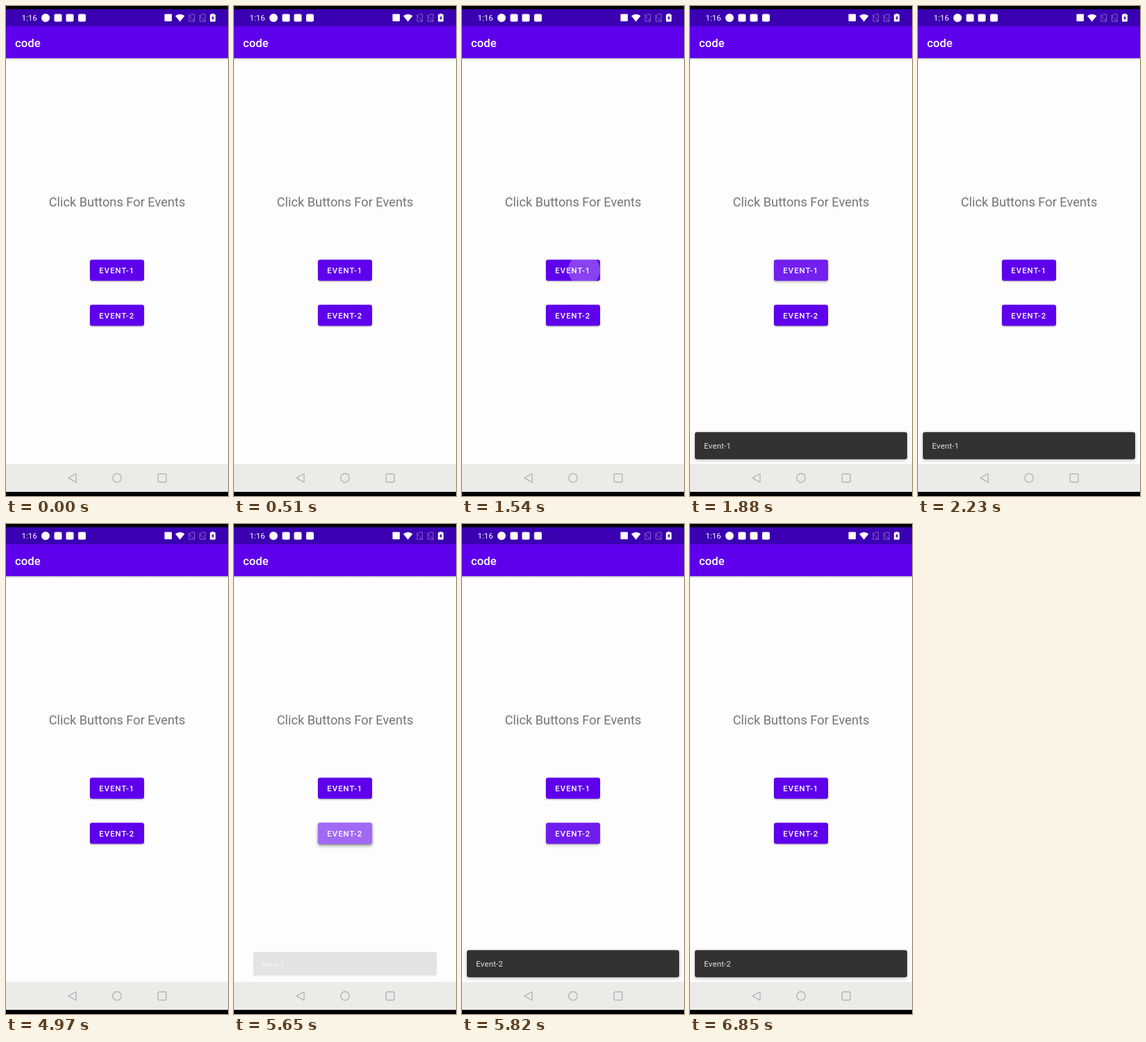
Recreate the animation shown at these times as an HTML page. Size 320 px wide and 704 px high, loop 8000 ms.

```html
<!DOCTYPE html>
<html lang="en">
<head>
<meta charset="utf-8">
<title>Button events</title>
<style>
html, body { margin: 0; width: 100%; height: 100%; overflow: hidden; background: #000; }
svg { display: block; width: 100vw; height: 100vh; font-family: Roboto, sans-serif; }
.label { font-size: 11.4px; font-weight: 500; letter-spacing: 1.02px; fill: #fff; }
.nav { fill: none; stroke: #b4b4b8; stroke-width: 1.4; stroke-linejoin: round; }
</style>
</head>
<body>
<svg viewBox="0 0 320 704" xmlns="http://www.w3.org/2000/svg">
  <defs>
    <filter id="soft" x="-20%" y="-60%" width="140%" height="220%"><feGaussianBlur stdDeviation="1"/></filter>
    <filter id="softer" x="-20%" y="-60%" width="140%" height="220%"><feGaussianBlur stdDeviation="2.6"/></filter>
    <linearGradient id="edge" x1="0" y1="0" x2="0" y2="1">
      <stop offset="0" stop-color="#666" stop-opacity=".35"/>
      <stop offset="1" stop-color="#666" stop-opacity="0"/>
    </linearGradient>
  </defs>
  <rect width="320" height="704" fill="#000"/>
  <rect y="75" width="320" height="583" fill="#fdfdfd"/>
  <rect y="75" width="320" height="3" fill="url(#edge)"/>
  <rect y="4.6" width="320" height="25" fill="#3a00b2"/>
  <rect y="29" width="320" height="46" fill="#5f00ec"/>

  <g fill="#fff">
    <text x="22.5" y="21" font-size="11.6">1:16</text>
    <circle cx="57" cy="17" r="6"/>
    <rect x="69.5" y="11.5" width="11" height="11" rx="2"/>
    <rect x="86.5" y="11.5" width="11" height="11" rx="2"/>
    <rect x="104" y="11.5" width="11" height="11" rx="2"/>
    <rect x="228.5" y="11.5" width="10.5" height="10.5" rx="1"/>
    <path d="M244 14.3Q250.7 9.2 257.4 14.3L250.7 22.6Z"/>
    <path d="M296.3 12V11H299.7V12H301Q302 12 302 13V21.5Q302 22.5 301 22.5H295Q294 22.5 294 21.5V13Q294 12 295 12Z"/>
  </g>
  <path d="M298.7 13.6L296 17.8H297.6V20.8L300.2 16.6H298.7Z" fill="#3a00b2"/>
  <g id="sims" fill="none" stroke="#8a62cc" stroke-width="1"></g>

  <text x="13" y="58.6" font-size="16.7" font-weight="500" fill="#fff">code</text>
  <text x="160" y="288.3" font-size="18.25" text-anchor="middle" fill="#757575">Click Buttons For Events</text>

  <g id="buttons"></g>

  <rect y="658" width="320" height="40" fill="#ebebea"/>
  <g class="nav">
    <path d="M101 672V684.4L90 678.2Z"/>
    <circle cx="160" cy="678" r="6.2"/>
    <rect x="219.2" y="672.2" width="11.8" height="11.8" rx="2"/>
  </g>

  <g id="snack">
    <rect x="7" y="613.5" width="306" height="39" rx="3" fill="#777" opacity=".5" filter="url(#softer)"/>
    <rect x="7" y="612.3" width="306" height="39" rx="3" fill="#323232"/>
    <text id="msg" x="20.3" y="636.2" font-size="11.4" letter-spacing=".2" fill="#e2e2e2"></text>
  </g>
</svg>
<script>
const LOOP = 8000;

// Moments at which the screen refreshes.
const steps = [0, 1540, 1710, 1880, 2060, 2230, 4620, 4800, 4970, 5310, 5480, 5650, 5820, 5990];

const taps = [
  { n: 1, x: 176, down: 1540, up: 1700 },
  { n: 2, x: 168, down: 5310, up: 5632 }
];
const snacks = [
  { n: 1, show: 1715, hide: 4605 },
  { n: 2, show: 5632, hide: Infinity }
];

const $ = id => document.getElementById(id);
const clamp = v => Math.min(1, Math.max(0, v));
const easeOut = p => 1 - (1 - p) ** 3;

function set(id, attrs) {
  for (const key in attrs) $(id).setAttribute(key, attrs[key]);
}

$('sims').innerHTML = [262.5, 278].map(x =>
  `<path d="M${x + 4} 12H${x + 9}V22H${x + 1.5}V14.5ZM${x} 12.5L${x + 9.5} 22.5"/>`).join('');

$('buttons').innerHTML = [1, 2].map(n => {
  const y = 299.6 + n * 64.8;
  const box = dy => `<rect x="121" y="${y + dy}" width="78" height="30.3" rx="3"`;
  return `<clipPath id="clip${n}">${box(0)}/></clipPath>
    ${box(3)} id="lift${n}" fill="#888" filter="url(#softer)"/>
    ${box(1)} fill="#777" opacity=".6" filter="url(#soft)"/>
    ${box(0)} fill="#5f00ec"/>
    <g clip-path="url(#clip${n})"><circle id="ripple${n}" cy="${y + 15}" fill="#fff"/></g>
    <text class="label" x="134.3" y="${y + 19.6}">EVENT-${n}</text>`;
}).join('');

function drawTap({ n, x, down, up }, t) {
  const age = t - down;
  const held = age < 0 ? 0 : 1 - clamp((t - up) / 250);
  set('ripple' + n, {
    cx: x,
    r: Math.max(0, 23 + age * .2),
    opacity: held * (.26 + .19 * clamp(age / 340))
  });
  set('lift' + n, { opacity: held * clamp(age / 200) * .8 });
}

function drawSnack(t) {
  const snack = snacks.find(s => t >= s.show && t < s.hide + 75);
  $('snack').style.display = snack ? '' : 'none';
  if (!snack) return;
  const p = clamp((t - snack.show) / 150);
  const scale = .8 + .2 * easeOut(p);
  set('snack', {
    transform: `translate(160 631.8) scale(${scale}) translate(-160 -631.8)`,
    opacity: p * (1 - clamp((t - snack.hide) / 75))
  });
  $('msg').textContent = 'Event-' + snack.n;
}

function draw(time) {
  const t = steps.filter(s => s <= time).pop();
  taps.forEach(tap => drawTap(tap, t));
  drawSnack(t);
}

const begin = performance.now();
function tick() {
  draw((performance.now() - begin) % LOOP);
  requestAnimationFrame(tick);
}
draw(0);
requestAnimationFrame(tick);
</script>
</body>
</html>
```
